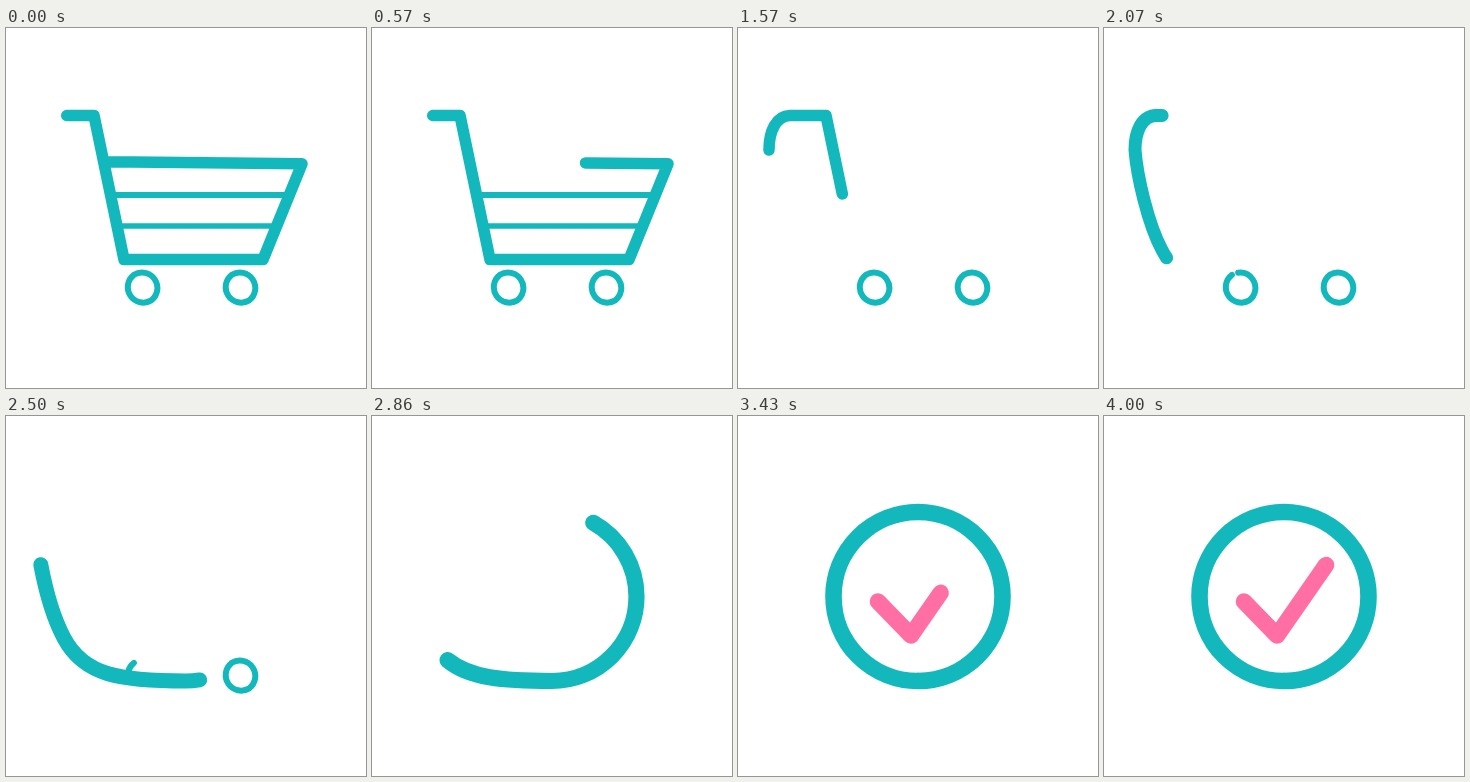
Recreate the animation shown at these times as an HTML page. Size 360 by 360 pixels, loop 5 s.

```html
<!DOCTYPE html>
<html lang="en">
<head>
<meta charset="utf-8">
<title>Cart to check mark</title>
<style>
  html, body { margin: 0; width: 100%; height: 100%; overflow: hidden; background: #fff; }
  svg { display: block; width: 100%; height: 100%; fill: none; stroke: #12b8bb; stroke-linecap: round; stroke-linejoin: round; }
</style>
</head>
<body>
<svg viewBox="0 0 360 360">
  <path id="upper" stroke-width="6" stroke-linecap="butt" d="M104 167H281"/>
  <path id="lower" stroke-width="5.5" stroke-linecap="butt" d="M112 198H268"/>
  <path id="left" stroke-width="6"/>
  <path id="right" stroke-width="6"/>
  <path id="snake" d="M101 133.8L296 135.8L257 231.5H118L88 87.5H52C38 88 31 103 31 122C33 148 44 196 58 222C78 260 115 265 180 265A84.5 84.5 0 0 0 180 96A84.5 84.5 0 0 0 180 265"/>
  <path id="check" stroke="#ff6fa3" stroke-width="16.5" d="M140 185.5L173 219.5L222 149"/>
</svg>
<script>
const LOOP = 5000;
const el = id => document.getElementById(id);
const snake = el('snake');

// Wheel outlines start and end at the upper left, running clockwise.
const wheel = (id, cx, cy = 259.6, dx = 8.7, dy = 12.8) =>
  el(id).setAttribute('d', `M${cx - dx} ${cy - dy}A15.5 15.5 0 0 1 ${cx + dx} ${cy + dy}A15.5 15.5 0 0 1 ${cx - dx} ${cy - dy}`);
wheel('left', 136.6);
wheel('right', 234.5);

const total = snake.getTotalLength();
const ring = total - 2 * Math.PI * 84.5;
const head = [[1110, 611.7], [1570, 665], [2500, ring + 13], [2860, ring + 221], [3400, total]];
const tail = [[0, 0], [1000, 260.5], [1570, 504], [2290, 655], [2500, 692], [2860, ring - 109], [3400, ring]];
const width = [[1570, 11.5], [2500, 15], [2860, 16.2], [3400, 16.6]];

// Monotone cubic curve through [time, value] keys, at rest at both ends.
function curve(keys, t) {
  const last = keys.length - 1;
  if (t <= keys[0][0]) return keys[0][1];
  if (t >= keys[last][0]) return keys[last][1];
  const i = keys.findIndex(k => k[0] > t) - 1;
  const slope = j => (keys[j + 1][1] - keys[j][1]) / (keys[j + 1][0] - keys[j][0]);
  const tangent = j => {
    if (j === 0 || j === last) return 0;
    const a = slope(j - 1), b = slope(j);
    return 2 * a * b / (a + b);
  };
  const [t0, v0] = keys[i], [t1, v1] = keys[i + 1];
  const d = t1 - t0, u = (t - t0) / d, w = 1 - u;
  return v0 * (1 + 2 * u) * w * w + v1 * (3 - 2 * u) * u * u
    + d * u * w * (tangent(i) * w - tangent(i + 1) * u);
}

const ease = (t, from, to) => {
  const u = Math.min(1, Math.max(0, (t - from) / (to - from)));
  return (1 - Math.cos(Math.PI * u)) / 2;
};

// Shows only the part of a path between two lengths.
function trim(path, from, to) {
  path.style.visibility = to - from > 0.01 ? 'visible' : 'hidden';
  path.setAttribute('stroke-dasharray', `${Math.max(0, to - from)} 9999`);
  path.setAttribute('stroke-dashoffset', -from);
}

function part(id, from, to) {
  const path = el(id), length = path.getTotalLength();
  trim(path, from * length, to * length);
}

function draw(t) {
  trim(snake, curve(tail, t), curve(head, t));
  snake.setAttribute('stroke-width', curve(width, t));
  part('upper', 0, 1 - ease(t, 700, 1460));
  part('lower', 0, 1 - ease(t, 930, 1530));
  part('left', ease(t, 1950, 2660), 1);
  part('right', ease(t, 2500, 2850), 1);
  part('check', 0, ease(t, 3000, 3650));
}

const start = performance.now();
function frame() {
  draw((performance.now() - start) % LOOP);
  requestAnimationFrame(frame);
}
frame();
</script>
</body>
</html>
```
